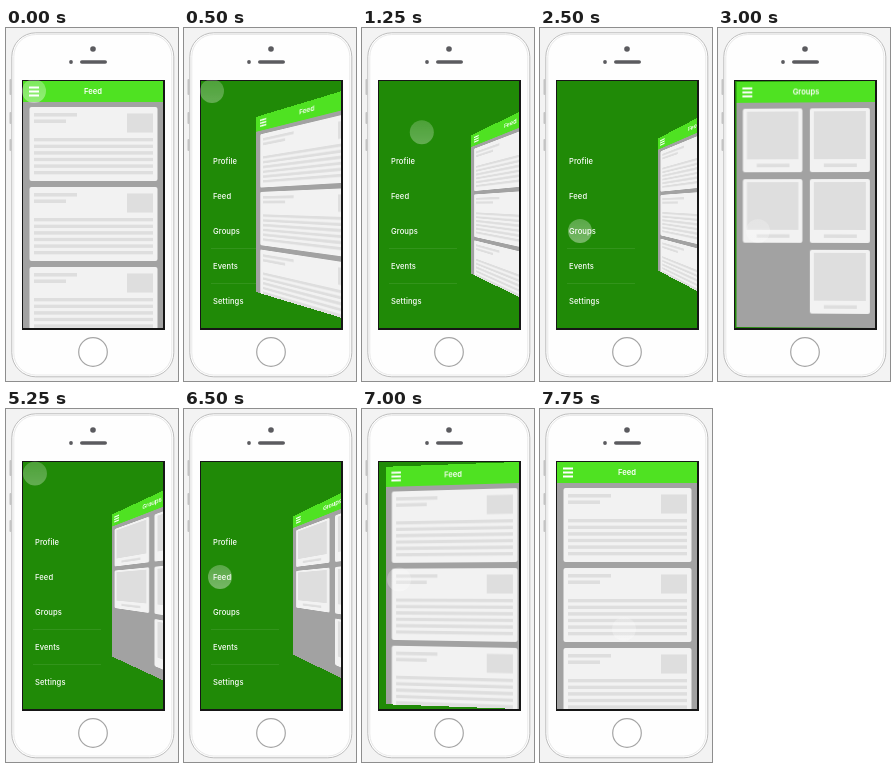
Animation of 172x353 px, one loop 8 s. Source, as an HTML page:

```html
<!DOCTYPE html>
<html lang="en">
<head>
<meta charset="utf-8">
<style>
  html, body { margin: 0; width: 100%; height: 100%; overflow: hidden; background: #f3f3f3; }
  #stage { position: relative; width: 172px; height: 353px; overflow: hidden; }
  svg { position: absolute; left: 0; top: 0; overflow: visible; }
  text { font-family: Inter, "Open Sans", sans-serif; fill: #fff; }
  #screen { position: absolute; left: 17px; top: 53px; width: 140px; height: 247px; overflow: hidden;
    background: #208a07; perspective: 139px; box-shadow: .5px .5px 0 1.5px #161616; }
  #page { overflow: hidden; transform-origin: 50% 50%; }
  #touch { position: absolute; left: -12px; top: -12px; width: 24px; height: 24px; border-radius: 50%;
    background: linear-gradient(#fff6, #fff9); }
</style>
</head>
<body>
<div id="stage">
  <svg width="172" height="353">
    <g fill="#c4c4c4">
      <rect x="3.5" y="51" width="2" height="16" rx="1"/>
      <rect x="3.5" y="84" width="2" height="12" rx="1"/>
      <rect x="3.5" y="111" width="2" height="12" rx="1"/>
    </g>
    <rect x="5.8" y="4.8" width="162" height="344" rx="24" fill="#fff" stroke="#bdbdbd"/>
    <rect x="7.8" y="6.5" width="158" height="340.5" rx="22" fill="#fefefe" stroke="#e9e9e9"/>
    <g fill="#5b5b5f">
      <circle cx="87" cy="21" r="2.8"/>
      <circle cx="65" cy="34" r="1.9"/>
      <rect x="74" y="32.2" width="27" height="3.6" rx="1.8"/>
    </g>
    <circle cx="87" cy="324" r="14.3" fill="#fff" stroke="#a5a5a5" stroke-width="1.2"/>
  </svg>
  <div id="screen">
    <svg id="menu" width="140" height="247"></svg>
    <svg id="page" width="140" height="247">
      <rect width="140" height="247" fill="#a2a2a2"/>
      <g id="Feed"></g>
      <g id="Groups"></g>
      <rect width="140" height="21" fill="#4fe222"/>
      <path d="M6 6.5h10M6 10.5h10M6 14.5h10" stroke="#fff" stroke-width="2"/>
      <text id="title" x="70" y="13.3" font-size="7.6" font-weight="600" text-anchor="middle"></text>
    </svg>
  </div>
  <div id="touch"></div>
</div>
<script>
const $ = id => document.getElementById(id);
const rect = (x, y, w, h, fill, r = 0) =>
  `<rect x="${x}" y="${y}" width="${w}" height="${h}" rx="${r}" fill="${fill}"/>`;
const PAPER = '#f2f2f2', INK = '#dedede';

function feedCard(y) {
  let s = rect(6.5, y, 128, 74, PAPER, 2) + rect(11, y + 6, 43, 3.5, INK) +
    rect(11, y + 12.5, 32, 3.5, INK) + rect(104, y + 6.5, 26, 19, INK);
  for (let i = 0; i < 6; i++) s += rect(11, y + 31 + i * 6.6, 119, 3.4, INK);
  return s;
}
const groupCard = (x, y) => rect(x, y, 60, 64, PAPER, 2) +
  rect(x + 4, y + 3, 52, 48, INK) + rect(x + 14, y + 55.5, 33, 3.5, INK);

$('Feed').innerHTML = [26, 106, 186].map(feedCard).join('');
$('Groups').innerHTML = [0, 1, 2, 3, 5].map(i =>
  groupCard(6.5 + i % 2 * 67.5, 27 + (i >> 1) * 71)).join('');
$('menu').innerHTML = ['Profile', 'Feed', 'Groups', 'Events', 'Settings'].map((name, i) =>
  `<text x="12" y="${82.5 + 35 * i}" font-size="7.6" font-weight="500" letter-spacing=".1">${name}</text>`).join('') +
  rect(10, 167, 68, .6, '#ffffff26') + rect(10, 202, 68, .6, '#ffffff26');

const LOOP = 8000, STEP = 250;
const progress = (t, start, length) => Math.min(1, Math.max(0, (t - start) / length));
const easeInOut = u => u < .5 ? 2 * u * u : 1 - 2 * (1 - u) ** 2;

// 0 = page closed, 1 = menu open; a choice pushes the page out before it returns.
const PUSH = 1.3;
function openness(t, open, choose) {
  if (t < choose) return easeInOut(progress(t, open, 750));
  const out = progress(t, choose, 200);
  if (out < 1) return 1 + (PUSH - 1) * Math.sin(out * Math.PI / 2);
  return PUSH * (1 - progress(t, choose + 200, 450)) ** 3;
}

// Touch moves: start, length, then from, control and to points.
const MOVES = [
  [750, 1150, [28, 63], [92, 108], [40, 203]],
  [3250, 1100, [40, 204], [50, 130], [28.5, 64]],
  [5200, 1000, [28.5, 64], [75, 110], [36, 168]],
  [6900, 850, [36, 168], [55, 215], [84, 220]]
];
const PRESSES = [0, 2450, 4650, 6500];

function touchAt(t) {
  const move = MOVES.findLast(m => t >= m[0]) || MOVES[0];
  const [start, length, a, c, b] = move;
  const u = easeInOut(progress(t, start, length)), v = 1 - u;
  return a.map((p, i) => v * v * p + 2 * u * v * c[i] + u * u * b[i]);
}

function draw(now) {
  const t = Math.floor(now % LOOP / STEP) * STEP;
  const p = t < 4000 ? openness(t, 125, 2440) : openness(t, 4625, 6500);
  $('page').style.transform =
    `translate3d(${85.6 * p}px, 0, ${-56 * p}px) rotateY(${-49 * p}deg)`;

  const name = t >= 2600 && t < 6700 ? 'Groups' : 'Feed';
  for (const id of ['Feed', 'Groups']) $(id).style.display = id === name ? '' : 'none';
  $('title').textContent = name;

  const [x, y] = touchAt(t);
  const press = Math.max(...PRESSES.map(at => 1 - progress(Math.abs(t - at), 100, 300)));
  $('touch').style.transform = `translate(${x}px, ${y}px)`;
  $('touch').style.opacity = .5 + .15 * press;
  requestAnimationFrame(draw);
}
requestAnimationFrame(draw);
</script>
</body>
</html>
```
